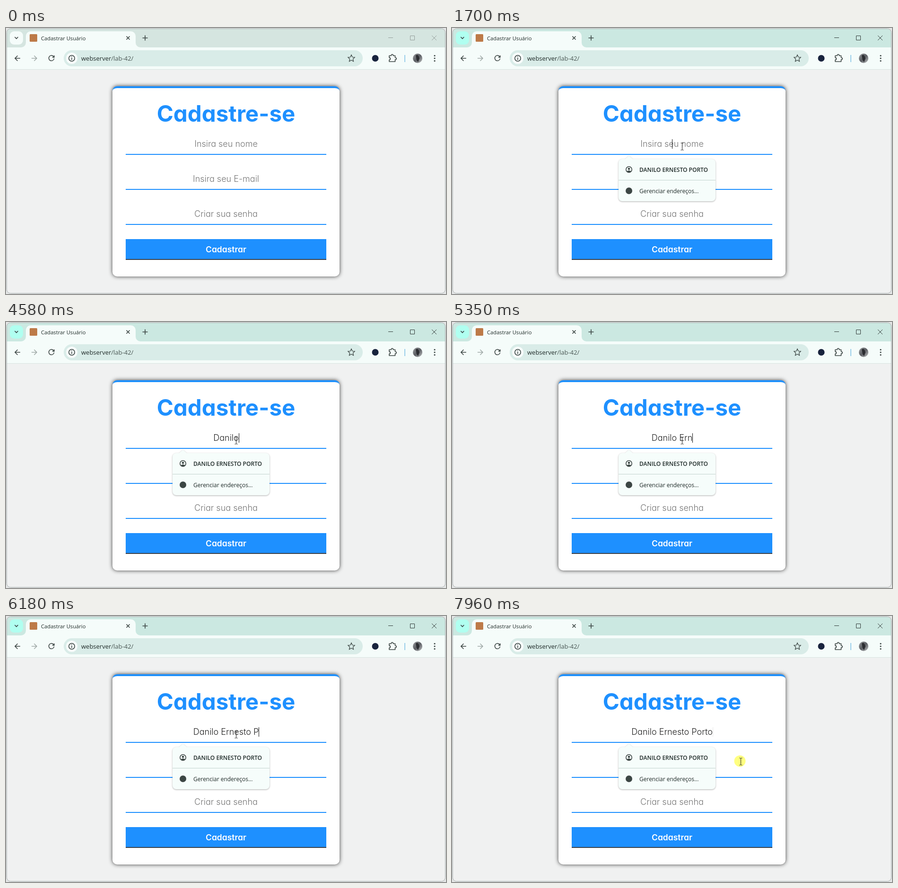
Write an HTML page that moves like this. It is 930 px wide and 562 px high and loops after 8 s.

```html
<!DOCTYPE html>
<html lang="pt-BR">
<head>
<meta charset="utf-8">
<title>Cadastrar Usuário</title>
<style>
  html, body { margin: 0; width: 100%; height: 100%; overflow: hidden; background: #e4e6e6; }
  svg { display: block; position: absolute; left: 0; top: 0; }
  .ui { font-family: "Open Sans", "Noto Sans", sans-serif; fill: #1f2a28; }
  .form { font: 300 18px Inter, Lato, sans-serif; font-feature-settings: "cv11"; text-anchor: middle; }
  .hint { fill: #757575; }
  .line { fill: none; stroke: #3c4644; stroke-width: 1.6; }
  .card {
    position: absolute; left: 225px; top: 123px; width: 480px; height: 402px;
    box-sizing: border-box; border-top: 4px solid #1e90ff; border-radius: 10px;
    background: #fff; box-shadow: 0 0 8px #3a3a3a;
  }
</style>
</head>
<body>
<svg width="930" height="562" viewBox="0 0 930 562">
  <defs>
    <linearGradient id="photo" x2="1" y2="1">
      <stop offset="0" stop-color="#9a9c9f"/>
      <stop offset=".5" stop-color="#5b5e63"/>
      <stop offset="1" stop-color="#c2c3c4"/>
    </linearGradient>
  </defs>

  <rect x="1.5" y="1.5" width="927" height="559" rx="8" fill="#f0f1f1"/>
  <path id="titleBar" d="M2 42V10a8 8 0 0 1 8-8H920a8 8 0 0 1 8 8V42z"/>
  <rect id="tabSearch" x="8" y="7" width="28" height="28" rx="9"/>
  <path class="line" d="M18.5 19l3.5 3.5 3.5-3.5"/>
  <path d="M32 41a10 10 0 0 0 10-10V17a10 10 0 0 1 10-10H264a10 10 0 0 1 10 10v14a10 10 0 0 0 10 10z" fill="#f5fcfa"/>
  <rect x="50" y="13" width="16" height="16" rx="1.5" fill="#bd7a48"/>
  <text class="ui" x="74" y="26" font-size="11.2">Cadastrar Usuário</text>
  <path class="line" d="M254.5 17.5l7 7m0-7l-7 7M288.500 21h11M294 15.500v11"/>
  <path id="controls" fill="none" stroke-width="1" d="M808 20.500h10M854.500 16.500h9v9h-9zM900 16l10 10m0-10l-10 10"/>

  <rect x="2" y="41" width="926" height="46" fill="#f5fcfa"/>
  <rect x="2" y="87" width="926" height="1" fill="#d8e4e1"/>
  <path class="line" d="M30 64H19m5.500-5.500L19 64l5.500 5.500"/>
  <path class="line" stroke-opacity=".45" d="M54 64h11m-5.500-5.500L65 64l-5.500 5.500"/>
  <path class="line" d="M101 61a5.600 5.600 0 1 0 .6 3.500M101.800 58v4h-4"/>
  <rect x="122" y="47" width="632" height="34" rx="17" fill="#d9ece8"/>
  <circle cx="139" cy="64" r="12" fill="#f8fdfc"/>
  <circle class="line" cx="139" cy="64" r="6.200" stroke-width="1.400"/>
  <path class="line" d="M139 63v4.500M139 60v1.600"/>
  <text class="ui" x="159" y="69" font-size="13">webserver<tspan fill="#4b5855">/lab-42/</tspan></text>
  <path class="line" stroke-width="2" transform="translate(720.5 54.500) scale(.79)"
    d="M12 3l2.700 5.900 6.300.7-4.700 4.300 1.300 6.300L12 17l-5.600 3.200 1.300-6.300L3 9.600l6.300-.7z"/>
  <circle cx="780.5" cy="64" r="7" fill="#18233d"/>
  <path class="line" stroke-linejoin="round"
    d="M810 58.500h4.300v-.7a2 2 0 0 1 4 0v.7h4.200v4.300h.7a2 2 0 0 1 0 4h-.7v4.200h-12.500v-3.600a2.400 2.400 0 0 0 0-4.800z"/>
  <rect x="842" y="57" width="2" height="15" fill="#9bcfea"/>
  <circle cx="870" cy="64" r="10" fill="url(#photo)"/>
  <path d="M866 58q4-3 6 1l2 5-3 8-3-4-1-5z" fill="#2b2d31"/>
  <g fill="#3c4644">
    <circle cx="906" cy="58.500" r="1.600"/><circle cx="906" cy="64" r="1.600"/><circle cx="906" cy="69.500" r="1.600"/>
  </g>
  <rect x="1.5" y="1.5" width="927" height="559" rx="8" fill="none" stroke="#a5abab"/>
</svg>

<div class="card"></div>

<svg width="930" height="562" viewBox="0 0 930 562">
  <text class="form" x="465" y="198" style="font-size:47.5px;font-weight:700" fill="#1e90ff">Cadastre-se</text>
  <text class="form" id="nameText" x="465" y="251"></text>
  <text class="form hint" x="465" y="325">Insira seu E-mail</text>
  <text class="form hint" x="465" y="399">Criar sua senha</text>
  <path d="M253 267H677M253 341H677M253 415H677" stroke="#1e90ff" stroke-width="2"/>
  <rect x="253" y="446" width="424" height="44" fill="#1e90ff"/>
  <rect x="253" y="488" width="424" height="2" fill="#3b4149"/>
  <text class="form" x="465" y="474" style="font-size:17.5px;font-weight:600" fill="#fff">Cadastrar</text>
  <rect id="caret" y="235" width="1" height="20" fill="#111"/>

  <g id="popup">
    <path style="filter:drop-shadow(0 1px 1.5px rgba(0,0,0,.32))" fill="#f6fdfb"
      d="M360 277H366l8-7 8 7H549a8 8 0 0 1 8 8V358a8 8 0 0 1-8 8H360a8 8 0 0 1-8-8V285a8 8 0 0 1 8-8z"/>
    <rect x="352" y="321" width="205" height="1" fill="#c3d3cf"/>
    <circle class="line" cx="374" cy="299" r="6.200"/>
    <circle cx="374" cy="297.500" r="2.300" fill="#3c4644"/>
    <path d="M369.500 303q4.500-4 9 0-4.500 4-9 0z" fill="#3c4644"/>
    <circle cx="374" cy="344" r="7" fill="#3c4644"/>
    <text class="ui" id="suggestion" x="396" y="304" font-size="12" font-weight="600"></text>
    <text class="ui" x="396" y="349" font-size="12">Gerenciar endereços...</text>
  </g>

  <g id="pointer">
    <circle id="click" cx="-2" cy="-1" r="12" fill="#ffff80"/>
    <path id="beam" fill="none" stroke="#222" d="M-3 -7.500H-1L0 -6.500L1 -7.500H3M0 -6.500V6.500M-3 7.500H-1L0 6.500L1 7.500H3"/>
    <path id="arrow" fill="#fff" stroke="#000" stroke-linejoin="round" d="M.5 .5V16.500L4.200 13L6.700 18.800L9.200 17.700L6.700 12H11.800z"/>
  </g>
</svg>

<script>
const LOOP = 8000;
const NAME = "Danilo Ernesto Porto";
const KEY_TIMES = [3630, 3720, 3920, 4020, 4430, 4580, 4730, 5000, 5200, 5350,
  5500, 5550, 5760, 5870, 5980, 6180, 6280, 6450, 6550, 6750];
const CARET_ON = [[1650, 2160], [2670, 3230], [3630, 7260], [7780, 7960]];
const CLICKS = [[1650, 1700], [7960, 8000]];
const POPUP_AT = 1700;
const START = [915, 344], NAME_FIELD = [486.5, 250], EMAIL_FIELD = [610.5, 307];

const el = id => document.getElementById(id);
const show = (id, on) => { el(id).style.display = on ? "" : "none"; };
const within = (spans, t) => spans.some(([a, b]) => t >= a && t < b);
const ease = p => p * p * (3 - 2 * p);
const mix = (a, b, p) => a.map((v, i) => v + (b[i] - v) * p);
const inBox = ([x, y], l, t, r, b) => x >= l && x <= r && y >= t && y <= b;

// Index of the current step when `count` changes are spread from a to b.
const stepAt = (t, a, b, count) =>
  Math.min(count - 1, Math.floor((t - a) / (b - a) * (count - 1) + 1e-6));

function pointerAt(t) {
  if (t < 7260) return mix(START, NAME_FIELD, ease(stepAt(t, 370, 1150, 16) / 15));
  return mix(NAME_FIELD, EMAIL_FIELD, ease((stepAt(t, 7260, 7810, 10) + 1) / 10));
}

function drawWindow(active) {
  el("titleBar").setAttribute("fill", active ? "#cbe8e1" : "#d5e5e0");
  el("tabSearch").setAttribute("fill", active ? "#b0fff0" : "#f5fcfa");
  el("controls").setAttribute("stroke", active ? "#333c3a" : "#949e9b");
}

function drawName(t) {
  const typed = KEY_TIMES.filter(k => t >= k).length;
  const text = el("nameText");
  text.textContent = typed ? NAME.slice(0, typed).replace(/ /g, "\u00a0") : "Insira seu nome";
  text.setAttribute("fill", typed ? "#222" : "#757575");
  const half = typed ? text.getComputedTextLength() / 2 : 0;
  el("caret").setAttribute("x", Math.round(465 + half));
  el("caret").setAttribute("opacity", within(CARET_ON, t) ? 1 : t >= 7960 ? .1 : 0);
}

function drawPointer(t) {
  const pos = pointerAt(t);
  const overPopup = t >= POPUP_AT && inBox(pos, 352, 277, 557, 366);
  const overField = inBox(pos, 253, 222, 677, 268) || inBox(pos, 253, 296, 677, 342);
  const beam = overField && !overPopup;
  show("pointer", t >= 370);
  show("beam", beam);
  show("arrow", !beam);
  show("click", within(CLICKS, t));
  const [x, y] = beam ? pos.map(v => Math.floor(v) + .5) : pos.map(Math.round);
  el("pointer").setAttribute("transform", `translate(${x} ${y})`);
}

function draw() {
  const t = performance.now() % LOOP;
  drawWindow(t >= 50);
  drawName(t);
  show("popup", t >= POPUP_AT);
  drawPointer(t);
  requestAnimationFrame(draw);
}

el("suggestion").textContent = NAME.toUpperCase();
draw();
</script>
</body>
</html>
```
